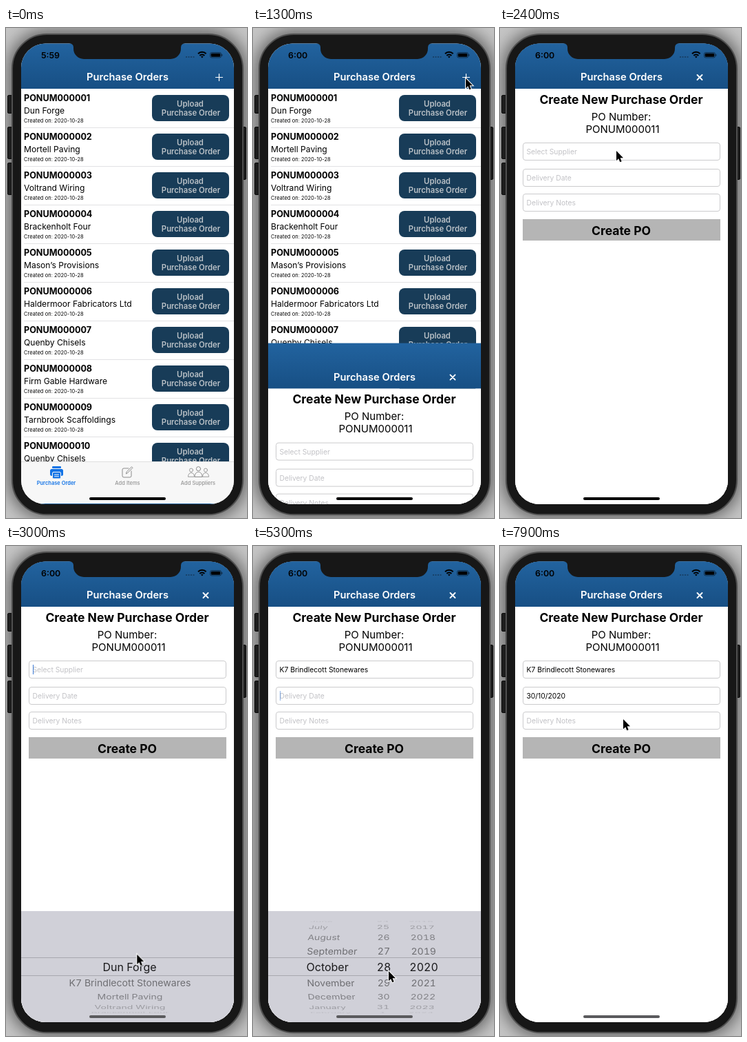
Write an HTML page that moves like this. It is 350 by 710 pixels and loops after 8000 ms.

```html
<!DOCTYPE html>
<html lang="en">
<head>
<meta charset="utf-8">
<title>Purchase Orders</title>
<style>
@property --roll { syntax: "<number>"; inherits: true; initial-value: 0; }

html, body { margin: 0; width: 100%; height: 100%; overflow: hidden; }
body { position: relative; background: #c6c6c6; font-family: Inter, sans-serif; color: #000; }
div, span, svg { position: absolute; white-space: nowrap; }
svg { left: 0; top: 0; overflow: visible; }
.stage { left: 0; top: 0; width: 350px; height: 710px; overflow: hidden; }
.key { background: #2b2b2b; border: 1px solid #111; border-radius: 2px; box-sizing: border-box; width: 7px; }
.phone {
  left: 8px; top: 8px; width: 337px; height: 698px; box-sizing: border-box;
  background: #171717; border: 2px solid #505050; border-radius: 51px;
  box-shadow: 0 0 24px 4px rgba(0, 0, 0, .55);
}
.screen { inset: 0; background: #fff; clip-path: inset(22.5px 19px 20px 22px round 35px); }
.mid { transform: translate(-50%, -50%); }
.left { transform: translateY(-50%); }
.bar { left: 22px; top: 22px; width: 309px; height: 66px; background: linear-gradient(#22639f, #174f84); }
.title { left: 176.5px; top: 71px; color: #fff; font-size: 14.7px; font-weight: 600; }

.row { left: 26px; width: 305px; height: 57px; border-bottom: 1px solid #e2e2e4; box-sizing: border-box; }
.num { top: 13px; font-size: 12.6px; font-weight: 700; }
.name { top: 30.7px; font-size: 12.1px; }
.made { top: 45.5px; font-size: 7.4px; letter-spacing: .1px; }
.upload { left: 185.5px; top: 9px; width: 112px; height: 37.5px; border-radius: 8px; background: #183c58; }
.upload span { color: #b9c0c6; font-size: 11.3px; font-weight: 600; }

.tabs { left: 22px; top: 628px; width: 309px; height: 62px; background: #f7f7f7; border-top: 1px solid #dedede; box-sizing: border-box; }
.tab { top: 659px; font-size: 7.5px; font-weight: 500; color: #949494; }
.tab.on { color: #1273e6; font-weight: 600; }

.sheet { inset: 0; animation: rise 8s infinite; }
.paper { left: 22px; top: 88px; width: 309px; height: 602px; background: #fff; }
.head { left: 176px; font-size: 17.5px; font-weight: 700; }
.sub { font-size: 15px; }
.field { left: 33px; width: 287px; height: 26px; box-sizing: border-box; border: 1px solid #cbcbcd; border-radius: 4px; font-size: 10.3px; line-height: 24px; }
.field span { left: 4.5px; color: #c2c2c6; }
.field p { margin: 0; padding-left: 4.5px; display: flex; align-items: center; height: 24px; }
.field b { font-weight: 400; font-size: 0; }
.field i { visibility: hidden; width: 1.5px; height: 14px; background: #3d7bd6; }
.create { left: 33px; top: 277px; width: 287px; height: 31px; background: #b5b5b5; }

.picker { left: 22px; top: 529px; width: 309px; height: 161px; background: #d0d0d8; overflow: hidden; animation: keyboard 8s infinite; }
.face { inset: 0; }
.lens { left: 0; right: 0; top: 67px; height: 27px; box-sizing: border-box; background: #d0d0d8; border: solid #a8a8af; border-width: 1px 0; overflow: hidden; }
.wheel { top: 50%; --dx: -50%; --shift: 0px; --lean: 0deg; font-variant-numeric: tabular-nums; }
.drum .wheel span {
  --a: calc((var(--i) - var(--roll)) * 20deg);
  font-size: 14.1px; opacity: calc(cos(var(--a)) * .5);
  transform: translate(var(--dx), -50%)
    translate(calc((1 - cos(var(--a))) * var(--shift)), calc(sin(var(--a)) * 67px))
    skewX(calc(sin(var(--a)) * var(--lean))) scaleY(cos(var(--a)));
}
.lens .wheel span {
  font-size: 16px; color: #1a1a1c;
  transform: translate(var(--dx), -50%) translateY(calc((var(--i) - var(--roll)) * 26px));
}
.names { left: 157.5px; animation: rollName 8s infinite; }
.months { left: 55.5px; --dx: 0%; --shift: 6px; --lean: 11deg; }
.days { left: 168px; --shift: -2px; animation: rollDay 8s infinite; }
.years { left: 226px; --shift: -5px; --lean: -7deg; }

.home { left: 121px; top: 680px; width: 111px; height: 4px; border-radius: 2px; background: #000; }
.time { left: 51px; top: 39px; font-size: 12.4px; font-weight: 600; }
.cursor { animation: point 8s infinite; }

/* Hard switches */
.step { animation-duration: 8s; animation-timing-function: step-end; animation-iteration-count: infinite; }
.early { animation-name: early; }
.late { animation-name: late; }
.pickName { animation-name: listOnly; }
.pickDate { animation-name: dateOnly; }
.ph1 { animation-name: hint1; }
.ph2 { animation-name: hint2; }
.val1 { animation-name: value1; }
.val2 { animation-name: value2; }
.home { animation-name: dim; }
.caret1 { animation: focus1 8s step-end infinite, blink 1s -.5s infinite; }
.caret2 { animation: focus2 8s step-end infinite, blink 1s -.6s infinite; }

@keyframes early { 0% { visibility: visible } 6.25%, 100% { visibility: hidden } }
@keyframes late { 0% { visibility: hidden } 6.25%, 100% { visibility: visible } }
@keyframes listOnly { 0% { visibility: visible } 55%, 100% { visibility: hidden } }
@keyframes dateOnly { 0% { visibility: hidden } 55%, 100% { visibility: visible } }
@keyframes hint1 { 0% { visibility: visible } 44.5%, 100% { visibility: hidden } }
@keyframes hint2 { 0% { visibility: visible } 72.5%, 100% { visibility: hidden } }
@keyframes value1 { 0% { font-size: 0 } 44.5%, 100% { font-size: 10.3px } }
@keyframes value2 { 0% { font-size: 0 } 72.5%, 100% { font-size: 10.3px } }
@keyframes focus1 { 0% { visibility: hidden } 31.5% { visibility: visible } 55%, 100% { visibility: hidden } }
@keyframes focus2 { 0% { visibility: hidden } 55% { visibility: visible } 78.9%, 100% { visibility: hidden } }
@keyframes dim { 0% { background: #000 } 31.5%, 100% { background: #5a5a5d } }
@keyframes blink { 0%, 52% { opacity: 1 } 65%, 85% { opacity: 0 } 100% { opacity: 1 } }

/* Movement */
@keyframes rise {
  0%, 15.43% { transform: translateY(667px); animation-timing-function: cubic-bezier(.25, .6, .25, 1) }
  21.68%, 100% { transform: none }
}
@keyframes keyboard {
  0%, 31.5% { transform: translateY(161px); animation-timing-function: cubic-bezier(.25, .6, .25, 1) }
  37.75%, 78.94% { transform: none; animation-timing-function: cubic-bezier(.25, .6, .25, 1) }
  85.19%, 100% { transform: translateY(161px) }
}
@keyframes rollName { 0%, 41% { --roll: 0 } 44%, 100% { --roll: 1 } }
@keyframes rollDay { 0%, 67.5% { --roll: 0 } 71.5%, 100% { --roll: 2 } }
@keyframes point {
  0%, 4% { transform: translate(353px, 640px) }
  12.5% { transform: translate(333px, 120px) }
  14.2%, 22% { transform: translate(309px, 73px) }
  27.5%, 32.5% { transform: translate(169px, 178px) }
  40%, 41% { transform: translate(192px, 625px) }
  44%, 45% { transform: translate(192px, 602px) }
  49.5%, 56% { transform: translate(209px, 211px) }
  62%, 67.5% { transform: translate(197px, 616px) }
  71%, 71.5% { transform: translate(195px, 572px) }
  75%, 81.5% { transform: translate(185px, 333px) }
  88.5%, 100% { transform: translate(179px, 251px) }
}
</style>
</head>
<body>
<div class="stage">
  <div class="key" style="left:2px;top:97px;height:27px"></div>
  <div class="key" style="left:2px;top:143px;height:47px"></div>
  <div class="key" style="left:2px;top:195px;height:47px"></div>
  <div class="key" style="left:342px;top:143px;height:77px"></div>
  <div class="phone"></div>

  <div class="screen">
    <div id="list"></div>
    <div class="bar"></div>
    <span class="title mid">Purchase Orders</span>
    <div class="tabs"></div>
    <svg width="350" height="710" fill="none" stroke="#8c8c8c" stroke-linecap="round" stroke-linejoin="round">
      <path d="M304.5 71.5h10M309.5 66.5v10" stroke="#fff" stroke-width="1.2"/>
      <g fill="#1273e6" stroke="none">
        <rect x="67" y="635" width="13" height="3" rx="1.2"/>
        <rect x="64" y="639" width="19" height="10" rx="2.5"/>
        <rect x="67.5" y="643.5" width="12" height="9.5" rx="1.5" stroke="#f7f7f7"/>
      </g>
      <path d="M70.5 647h6M70.5 649.7h6" stroke="#f7f7f7"/>
      <path d="M178 638h-7a2 2 0 0 0-2 2v9a2 2 0 0 0 2 2h9a2 2 0 0 0 2-2v-7M174.5 645.5l.7-2.4 7.3-7.3 1.5 1.5-7.3 7.3z"/>
      <g id="people"></g>
    </svg>
    <span class="tab on mid" style="left:73px">Purchase Order</span>
    <span class="tab mid" style="left:176.5px">Add Items</span>
    <span class="tab mid" style="left:279px">Add Suppliers</span>

    <div class="sheet">
      <div class="bar"></div>
      <span class="title mid">Purchase Orders</span>
      <svg width="350" height="710"><path d="M286.5 68l7 7m0-7l-7 7" stroke="#fff" stroke-width="1.9" stroke-linecap="round"/></svg>
      <div class="paper"></div>
      <span class="head mid" style="top:103px">Create New Purchase Order</span>
      <span class="sub mid" style="left:176px;top:127.5px">PO Number:</span>
      <span class="sub mid" style="left:178px;top:146px">PONUM000011</span>
      <div class="field" style="top:166px">
        <span class="step ph1">Select Supplier</span>
        <p><b class="step val1" id="supplier"></b><i class="caret1"></i></p>
      </div>
      <div class="field" style="top:204px">
        <span class="step ph2">Delivery Date</span>
        <p><b class="step val2">30/10/2020</b><i class="caret2"></i></p>
      </div>
      <div class="field" style="top:240px"><span>Delivery Notes</span></div>
      <div class="create"></div>
      <span class="head mid" style="top:293px">Create PO</span>
    </div>

    <div class="picker">
      <div class="face step pickName" id="namePicker"></div>
      <div class="face step pickDate" id="datePicker"></div>
    </div>
    <div class="home step"></div>
  </div>

  <svg width="350" height="710">
    <path d="M92 22H260Q254 23 254 28V30a15 15 0 0 1-15 15H113a15 15 0 0 1-15-15V28Q98 23 92 22Z" fill="#171717"/>
    <path d="M261 42h12.5" stroke="#173a5c" stroke-width="1.6" stroke-dasharray="2 1.5"/>
    <g fill="none" stroke="#000" stroke-width="2.1">
      <path d="M279 37.3a8 8 0 0 1 11.6 0M281.3 40a5 5 0 0 1 7 0"/>
      <path d="M284.8 43.5l-1.7-2a2.5 2.5 0 0 1 3.4 0z" fill="#000" stroke="none"/>
      <rect x="296.5" y="35.5" width="16" height="7.5" rx="2.2" stroke-width=".8" opacity=".6"/>
    </g>
    <rect x="297.7" y="36.7" width="13.6" height="5.1" rx="1.2"/>
    <path d="M313.8 37.8v3" stroke="#000" opacity=".6"/>
  </svg>
  <span class="time left step early">5:59</span>
  <span class="time left step late">6:00</span>

  <svg class="cursor" width="12" height="18">
    <path d="M0 0V14.2L3.2 11.2 5.3 16.2 7.7 15.2 5.6 10.3H10Z" stroke="#fff" stroke-width="2" paint-order="stroke"/>
  </svg>
</div>

<script>
const orders = [
  "Dun Forge", "Mortell Paving", "Voltrand Wiring", "Brackenholt Four", "Mason’s Provisions",
  "Haldermoor Fabricators Ltd", "Quenby Chisels", "Firm Gable Hardware", "Tarnbrook Scaffoldings", "Quenby Chisels"
];
const chosen = "K7 Brindlecott Stonewares";
const months = ["June", "July", "August", "September", "October", "November", "December", "January", "February"];
const $ = id => document.getElementById(id);
const range = (n, fn) => Array.from({ length: n }, (_, i) => fn(i));

$("list").innerHTML = orders.map((name, i) => `
  <div class="row" style="top:${88 + i * 56}px">
    <span class="num left">PONUM${String(i + 1).padStart(6, "0")}</span>
    <span class="name left">${name}</span>
    <span class="made left">Created on: 2020-10-28</span>
    <div class="upload">
      <span class="mid" style="left:56px;top:12.5px">Upload</span>
      <span class="mid" style="left:57px;top:25.5px">Purchase Order</span>
    </div>
  </div>`).join("");

const person = (x, y, s) => `<g transform="translate(${x} ${y}) scale(${s})">
  <circle cy="3.2" r="3.1"/><path d="M-5.5 14.5c0-9 11-9 11 0z"/></g>`;
$("people").innerHTML = person(269, 638, .82) + person(290, 638, .82) + person(279.5, 635.5, 1);

const wheel = (kind, items, first = 0) => `<div class="wheel ${kind}">` +
  items.map((s, i) => `<span style="--i:${i + first}">${s}</span>`).join("") + "</div>";
const fill = (id, wheels) => {
  $(id).innerHTML = `<div class="face drum">${wheels}</div><div class="lens">${wheels}</div>`;
};

$("supplier").textContent = chosen;
fill("namePicker", wheel("names", [orders[0], chosen, ...orders.slice(1, 7)]));
fill("datePicker",
  wheel("months", months, -4) +
  wheel("days", range(11, i => (i + 23) % 31 + 1), -4) +
  wheel("years", range(9, i => 2016 + i), -4));
</script>
</body>
</html>
```
